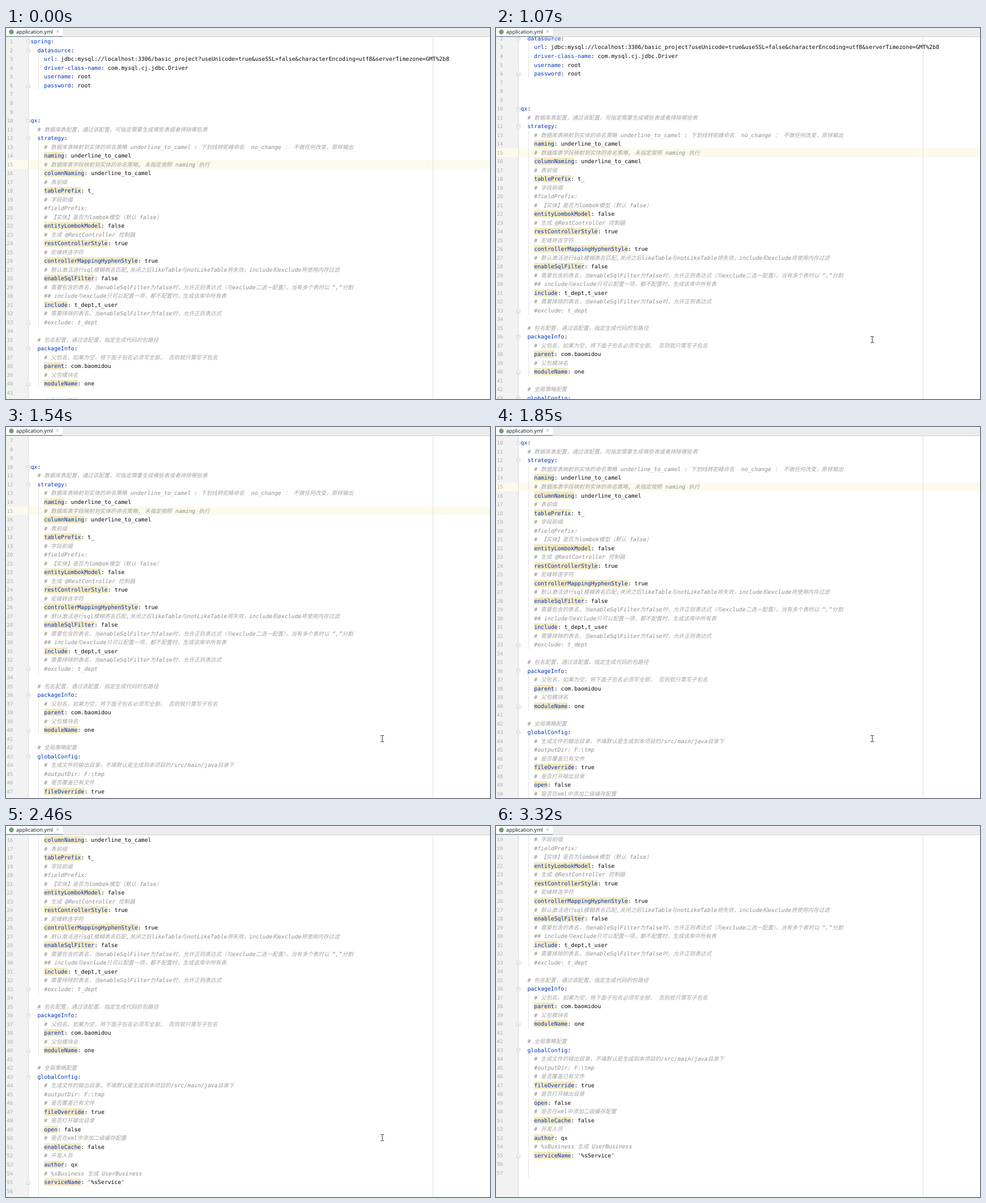
Animation of 854 by 656 pixels, one loop 4480 ms. Source, as an HTML page with a canvas:

```html
<!DOCTYPE html>
<html lang="zh">
<head>
<meta charset="utf-8">
<title>application.yml</title>
<style>
  html, body { margin: 0; width: 100%; height: 100%; overflow: hidden; background: #fff; }
  canvas { display: block; }
</style>
</head>
<body>
<canvas id="stage" width="854" height="656"></canvas>
<script>
const ctx = document.getElementById('stage').getContext('2d');
const W = 854, H = 656, LOOP = 4480;
const TOP = 16, LINE = 15.513, CHAR = 5.912, CJK = 9.62, TEXT_X = 43.6, GUTTER = 39;
const MONO = '"DejaVu Sans Mono", monospace';
const HAN = '"Noto Sans CJK SC", "Noto Sans CJK", sans-serif';
const CARET_LINE = 15;

const lines = String.raw`spring:
  datasource:
    url: jdbc:mysql://localhost:3306/basic_project?useUnicode=true&useSSL=false&characterEncoding=utf8&serverTimezone=GMT%2b8
    driver-class-name: com.mysql.cj.jdbc.Driver
    username: root
    password: root



qx:
  # 数据库表配置，通过该配置，可指定需要生成哪些表或者排除哪些表
  strategy:
    # 数据库表映射到实体的命名策略 underline_to_camel : 下划线转驼峰命名  no_change ： 不做任何改变，原样输出
    naming: underline_to_camel
    # 数据库表字段映射到实体的命名策略, 未指定按照 naming 执行
    columnNaming: underline_to_camel
    # 表前缀
    tablePrefix: t_
    # 字段前缀
    #fieldPrefix:
    # 【实体】是否为lombok模型（默认 false）
    entityLombokModel: false
    # 生成 @RestController 控制器
    restControllerStyle: true
    # 驼峰转连字符
    controllerMappingHyphenStyle: true
    # 默认激活进行sql模糊表名匹配,关闭之后likeTable与notLikeTable将失效，include和exclude将使用内存过滤
    enableSqlFilter: false
    # 需要包含的表名，当enableSqlFilter为false时，允许正则表达式（与exclude二选一配置），当有多个表时以“,”分割
    ## include与exclude只可以配置一项，都不配置时，生成该库中所有表
    include: t_dept,t_user
    # 需要排除的表名，当enableSqlFilter为false时，允许正则表达式
    #exclude: t_dept

  # 包名配置，通过该配置，指定生成代码的包路径
  packageInfo:
    # 父包名，如果为空，将下面子包名必须写全部， 否则就只需写子包名
    parent: com.baomidou
    # 父包模块名
    moduleName: one

  # 全局策略配置
  globalConfig:
    # 生成文件的输出目录，不填默认是生成到本项目的/src/main/java目录下
    #outputDir: F:\tmp
    # 是否覆盖已有文件
    fileOverride: true
    # 是否打开输出目录
    open: false
    # 是否在xml中添加二级缓存配置
    enableCache: false
    # 开发人员
    author: qx
    # %sBusiness 生成 UserBusiness
    serviceName: '%sService'

`.split('\n');

const guides = [[3, 6], [13, 33], [37, 40], [44, 57]];
const foldStarts = [1, 2, 10, 12, 36, 43];
const foldEnds = [6, 33, 40, 55];

// [time, scroll offset in lines]
const scrollSteps = [
  [0, 0], [1070, 1.35], [1150, 2.74], [1240, 3],
  [1390, 4.35], [1470, 5.74], [1540, 6],
  [1770, 7.35], [1850, 8.74], [1930, 9], [2010, 10.35], [2080, 11.74], [2160, 12],
  [2310, 13.35], [2390, 14.74], [2460, 14.96],
  [2540, 15.9], [2620, 17.1], [2700, 17.8], [2780, 18]
];
// [time, x, y]; no position means hidden
const pointerSteps = [
  [0], [300, 760, 637], [380, 706, 604], [460, 683, 589],
  [680, 681.5, 578], [760, 674, 565], [840, 667, 555], [920, 663.5, 551],
  [3180, 694, 568], [3250, 763, 593], [3320]
];

const stepAt = (steps, t) => steps.filter(s => s[0] <= t).pop();

function rect(x, y, w, h, color) {
  ctx.fillStyle = color;
  ctx.fillRect(x, y, w, h);
}

// Draws mixed Latin and Chinese text, returns the end x
function drawText(text, x, y, color, style = '') {
  for (const run of text.match(/[\u3000-\u9fff\uff00-\uffef]+|[^\u3000-\u9fff\uff00-\uffef]+/g) || []) {
    const han = run.charCodeAt(0) >= 0x3000;
    ctx.font = han ? `${style} 300 ${CJK}px ${HAN}` : `${style} ${9.82}px ${MONO}`;
    ctx.fillStyle = han ? '#a2a2a2' : color;
    ctx.fillText(run, x, y);
    x += run.length * (han ? CJK : CHAR);
  }
  return x;
}

function drawLine(text, number, top) {
  const base = Math.round(top + 11.1);
  ctx.font = `9px ${MONO}`;
  ctx.textAlign = 'right';
  ctx.fillStyle = '#adadad';
  ctx.fillText(number, 12.3, base);
  ctx.textAlign = 'left';

  const body = text.trimStart();
  const x = TEXT_X + (text.length - body.length) * CHAR;
  if (body.startsWith('#')) {
    drawText(body, x, base, '#8c8c8c', 'italic');
  } else if (body) {
    const colon = body.indexOf(':');
    const key = body.slice(0, colon);
    if (number > 10 && text.startsWith('    ')) {
      rect(x, Math.round(top + 1), colon * CHAR, 13, '#f5e9c1');
    }
    const end = drawText(key, x, base, '#0033b3');
    drawText(body.slice(colon), end, base, '#080808');
  }
}

function drawFold(number, dir, topOf) {
  const y = Math.round(topOf(number) + 7.8) + 0.5, x = GUTTER + 0.5;
  ctx.beginPath();
  ctx.moveTo(x - 3, y - 3 * dir);
  ctx.lineTo(x + 3, y - 3 * dir);
  ctx.lineTo(x + 3, y + 2 * dir);
  ctx.lineTo(x, y + 4 * dir);
  ctx.lineTo(x - 3, y + 2 * dir);
  ctx.closePath();
  ctx.fillStyle = '#fff';
  ctx.fill();
  ctx.strokeStyle = '#cfcfcf';
  ctx.stroke();
  rect(x - 1.5, y - 0.5, 3, 1, '#bcbcbc');
}

function drawEditor(scroll) {
  const topOf = n => TOP + 0.3 + (n - 1 - scroll) * LINE;
  ctx.save();
  ctx.beginPath();
  ctx.rect(0, TOP, W, H - TOP);
  ctx.clip();
  rect(0, TOP, GUTTER, H, '#f2f2f2');
  rect(0, topOf(CARET_LINE), W, LINE, '#fcfaed');
  rect(GUTTER, TOP, 1, H, '#d9d9d9');
  rect(753, TOP, 1, H, '#e0e0e0');
  for (const [from, to] of guides) {
    const y = topOf(from);
    rect(57, y, 1, topOf(to + 1) - y, '#e3e3e3');
  }
  lines.forEach((text, i) => {
    const top = topOf(i + 1);
    if (i < 57 && top > TOP - LINE && top < H) drawLine(text, i + 1, top);
  });
  foldStarts.forEach(n => drawFold(n, 1, topOf));
  foldEnds.forEach(n => drawFold(n, -1, topOf));
  ctx.restore();
}

function drawTab() {
  rect(0, 0, W, TOP, '#ececec');
  rect(0, 0, 100, TOP, '#fff');
  rect(0, 15, W, 1, '#d1d1d1');
  rect(0, 14, 100, 2, '#9ca9b8');
  ctx.fillStyle = '#6f9f72';
  ctx.beginPath();
  ctx.arc(9.5, 7, 4.2, 0, Math.PI * 2);
  ctx.fill();
  ctx.font = '9.15px "Open Sans", "Noto Sans", sans-serif';
  ctx.fillStyle = '#111';
  ctx.fillText('application.yml', 18, 9.5);
  ctx.strokeStyle = '#b5b5b5';
  ctx.beginPath();
  ctx.moveTo(88.5, 3.5);
  ctx.lineTo(93.5, 8.5);
  ctx.moveTo(93.5, 3.5);
  ctx.lineTo(88.5, 8.5);
  ctx.stroke();
}

function drawPointer(x, y) {
  const left = Math.round(x - 3), top = Math.round(y - 6);
  const ink = '#222';
  rect(left + 2.5, top + 1, 1, 10, ink);
  for (const edge of [top, top + 11]) {
    rect(left, edge, 2.5, 1, ink);
    rect(left + 3.5, edge, 2.5, 1, ink);
  }
}

function draw(t) {
  rect(0, 0, W, H, '#fff');
  ctx.lineWidth = 1;
  ctx.textRendering = 'geometricPrecision';
  drawEditor(stepAt(scrollSteps, t)[1]);
  drawTab();
  const [, x, y] = stepAt(pointerSteps, t);
  if (x) drawPointer(x, y);
}

let start;
function tick(now) {
  start ??= now;
  draw(Math.max(0, now - start) % LOOP);
  requestAnimationFrame(tick);
}
draw(0);
requestAnimationFrame(tick);
</script>
</body>
</html>
```
